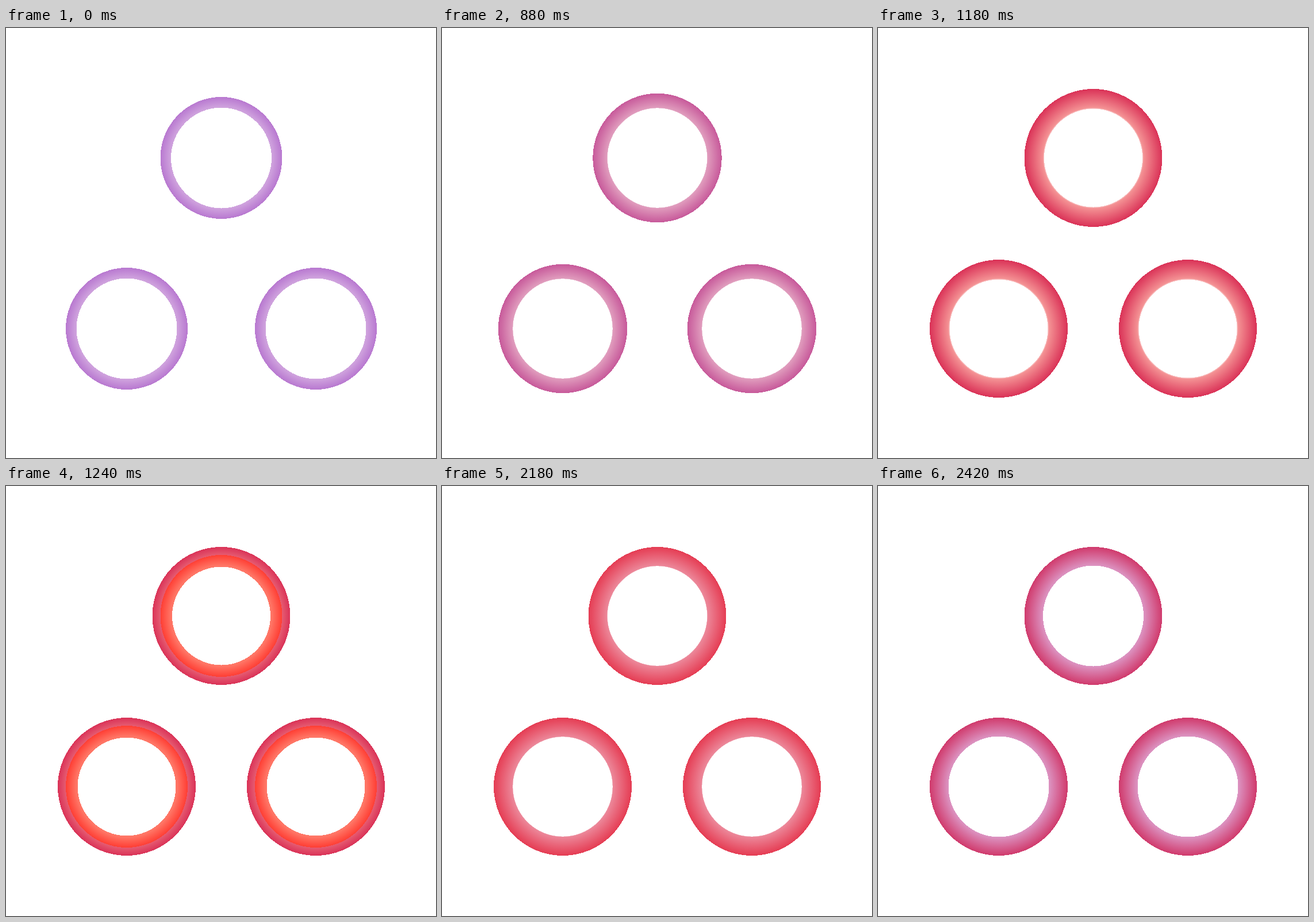
Write an HTML page that moves like this. It is 748x748 px and loops after 2480 ms.

```html
<!DOCTYPE html>
<html lang="en">
<head>
<meta charset="utf-8">
<title>Three pulsing rings</title>
<style>
  html, body { margin: 0; width: 100%; height: 100%; overflow: hidden; background: #fff; }
  svg { display: block; width: 100%; height: 100%; }
  circle { shape-rendering: crispEdges; }
</style>
</head>
<body>
<svg viewBox="0 0 748 748">
  <defs>
    <radialGradient id="haloFill" gradientUnits="userSpaceOnUse" cx="0" cy="0" r="120">
      <stop offset=".73"/><stop offset="1"/>
    </radialGradient>
    <radialGradient id="ringFill" gradientUnits="userSpaceOnUse" cx="0" cy="0" r="120">
      <stop/><stop/><stop/>
    </radialGradient>
    <g id="ring">
      <circle id="halo" r="120" fill="url(#haloFill)"/>
      <circle id="band" fill="url(#ringFill)"/>
      <circle id="hole" fill="#fff"/>
    </g>
  </defs>
  <use href="#ring" x="374.5" y="226"/>
  <use href="#ring" x="210" y="523"/>
  <use href="#ring" x="539" y="523"/>
</svg>
<script>
const LOOP = 2480, STEP = 60, STEPS = 9;
const GROW_AT = 700, RED_AT = 1240, FADE_AT = 1940;
const SMALL = 106, LARGE = 120, WIDE_HOLE = 87.5, TIGHT_HOLE = 85.5;
const WHITE = [255, 255, 255];

const lilac = { outer: [184, 120, 208], inner: [208, 164, 222] };
const rose = { outer: [218, 50, 87], inner: [244, 146, 148] };
const red = { outer: [255, 62, 52], inner: [255, 118, 102] };
const pink = { outer: [208, 58, 108], inner: [220, 148, 194] };

const byId = id => document.getElementById(id);
const halo = byId('halo'), band = byId('band'), hole = byId('hole');
const haloStops = byId('haloFill').children, ringStops = byId('ringFill').children;

const lerp = (a, b, p) => a + (b - a) * p;
const blend = (a, b, p) => a.map((v, i) => lerp(v, b[i], p));
const smooth = p => p * p * (3 - 2 * p);
const paint = (stop, color) => stop.setAttribute('stop-color', `rgb(${color.map(Math.round)})`);

// Number of steps begun since a phase started
const stepsSince = (t, start) => t < start ? 0 : Math.floor((t - start) / STEP) + 1;

function fadeSteps(t) {
  const n = stepsSince(t, FADE_AT);
  return n === 6 ? 5 : n; // the fade rests for one step
}

function draw(t) {
  const fading = t >= RED_AT;
  const p = (fading ? fadeSteps(t) : stepsSince(t, GROW_AT)) / STEPS;
  const [from, to] = fading ? [red, pink] : [lilac, rose];
  const growth = fading ? smooth(Math.min(1, 1.8 * p)) : p;
  const radius = lerp(SMALL, LARGE, growth);
  const holeRadius = lerp(TIGHT_HOLE, WIDE_HOLE, fading ? p : 1 - p);
  const inner = blend(from.inner, to.inner, p);
  const rim = blend(inner, WHITE, Math.min(.55, p));

  halo.setAttribute('visibility', fading ? 'visible' : 'hidden');
  band.setAttribute('r', radius);
  hole.setAttribute('r', holeRadius);
  [holeRadius, WIDE_HOLE, radius].forEach((r, i) => ringStops[i].setAttribute('offset', r / LARGE));
  paint(ringStops[0], rim);
  paint(ringStops[1], inner);
  paint(ringStops[2], blend(from.outer, to.outer, p));
}

paint(haloStops[0], rose.inner);
paint(haloStops[1], rose.outer);

let start;
function tick(now) {
  start ??= now;
  draw((now - start) % LOOP);
  requestAnimationFrame(tick);
}
draw(0);
requestAnimationFrame(tick);
</script>
</body>
</html>
```
